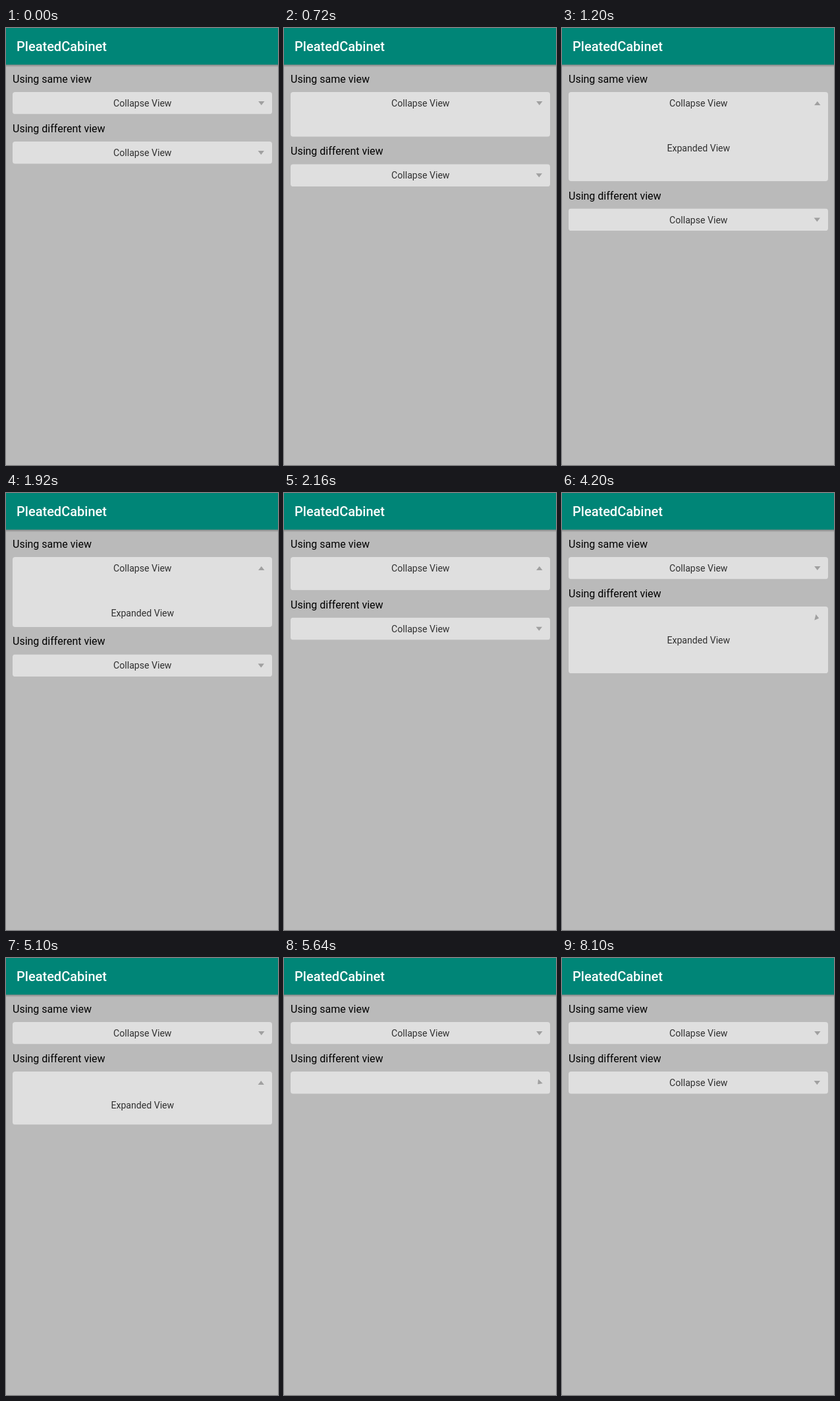
Write an HTML page that moves like this. It is 413 px wide and 662 px high and loops after 8.46 s.

```html
<!DOCTYPE html>
<html lang="en">
<head>
<meta charset="utf-8">
<title>Expanding panels</title>
<style>
  html, body { margin: 0; width: 100%; height: 100%; overflow: hidden; background: #bababa; }
  #stage { display: block; width: 413px; height: 662px; font-family: Roboto, sans-serif; }
  .title { font-size: 20px; font-weight: 500; fill: #fff; }
  .label { font-size: 16px; fill: #000; }
  .item { font-size: 14.1px; fill: #303030; text-anchor: middle; }
  .box { fill: #dfdfdf; }
  .arrow { fill: #a0a0a0; }
</style>
</head>
<body>
<svg id="stage" viewBox="0 0 413 662">
  <defs>
    <linearGradient id="shade" x1="0" y1="0" x2="0" y2="1">
      <stop offset="0" stop-color="#000" stop-opacity=".3"/>
      <stop offset="1" stop-color="#000" stop-opacity="0"/>
    </linearGradient>
  </defs>
  <rect width="413" height="662" fill="#bababa"/>
  <rect y="55" width="413" height="4.5" fill="url(#shade)"/>
  <rect width="413" height="55.5" fill="#008577"/>
  <text class="title" x="16" y="35">PleatedCabinet</text>

  <text class="label" x="10" y="83">Using same view</text>
  <svg id="first" x="10" y="97" width="394" height="33.5" overflow="hidden">
    <rect class="box" width="394" height="33.5" rx="4"/>
    <text class="item" x="197.3" y="22">Collapse View</text>
    <text class="item" x="197.3" y="90">Expanded View</text>
    <path class="arrow" d="M-4.7-3H4.7L0 3Z"/>
  </svg>

  <g id="lower">
    <text class="label" x="10" y="158">Using different view</text>
    <svg id="second" x="10" y="172" width="394" height="33.8" overflow="hidden">
      <rect class="box" width="394" height="33.8" rx="4"/>
      <text class="item head" x="197.3" y="22">Collapse View</text>
      <text class="item body" x="197.3" y="56">Expanded View</text>
      <path class="arrow" d="M-4.7-3H4.7L0 3Z"/>
    </svg>
  </g>
</svg>
<script>
const LOOP = 8460, TICK = 60, SLIDE = 640;
const OPEN_1 = 467, CLOSE_1 = 1690, OPEN_2 = 3467, CLOSE_2 = 4860;
const first = document.getElementById('first');
const second = document.getElementById('second');
const lower = document.getElementById('lower');
const head = second.querySelector('.head');
const body = second.querySelector('.body');

const part = (t, from, to) => Math.min(1, Math.max(0, (t - from) / (to - from)));
const ease = x => (1 - Math.cos(Math.PI * x)) / 2;
const slide = (t, start) => ease(part(t, start, start + SLIDE));
const openness = (t, open, close) => slide(t, open) - slide(t, close);

// The arrow turns counter-clockwise once the panel has stopped.
function turn(t, start, end, from, to) {
  return from + (to - from) * part(t, start + SLIDE, end);
}

function firstAngle(t) {
  if (t < CLOSE_1) return turn(t, OPEN_1, 1200, 0, -180);
  return t < 3480 ? turn(t, CLOSE_1, 2520, -180, -348) : 0;
}

function secondAngle(t) {
  if (t < CLOSE_2) return turn(t, OPEN_2, 4200, 0, -76);
  return t < 8100 ? turn(t, CLOSE_2, 5640, -180, -316) : 0;
}

function setPanel(panel, height, x, angle) {
  panel.setAttribute('height', height);
  panel.querySelector('.box').setAttribute('height', height);
  panel.querySelector('.arrow').setAttribute('transform', `translate(${x} 17) rotate(${angle})`);
}

function show(el, on) {
  el.setAttribute('visibility', on ? 'visible' : 'hidden');
}

function draw(time) {
  const t = Math.floor((time % LOOP) / TICK) * TICK;
  const shift = 101.5 * openness(t, OPEN_1, CLOSE_1);
  setPanel(first, 33.5 + shift, 377.8, firstAngle(t));
  lower.setAttribute('transform', `translate(0 ${shift})`);

  setPanel(second, 33.8 + 67.4 * openness(t, OPEN_2, CLOSE_2), 377.3, secondAngle(t));
  const swapped = t >= 3480 && t < 8100;
  show(head, !swapped);
  show(body, swapped && t < CLOSE_2 + SLIDE);
}

const begin = performance.now();
function frame() {
  draw(performance.now() - begin);
  requestAnimationFrame(frame);
}
draw(0);
requestAnimationFrame(frame);
</script>
</body>
</html>
```
